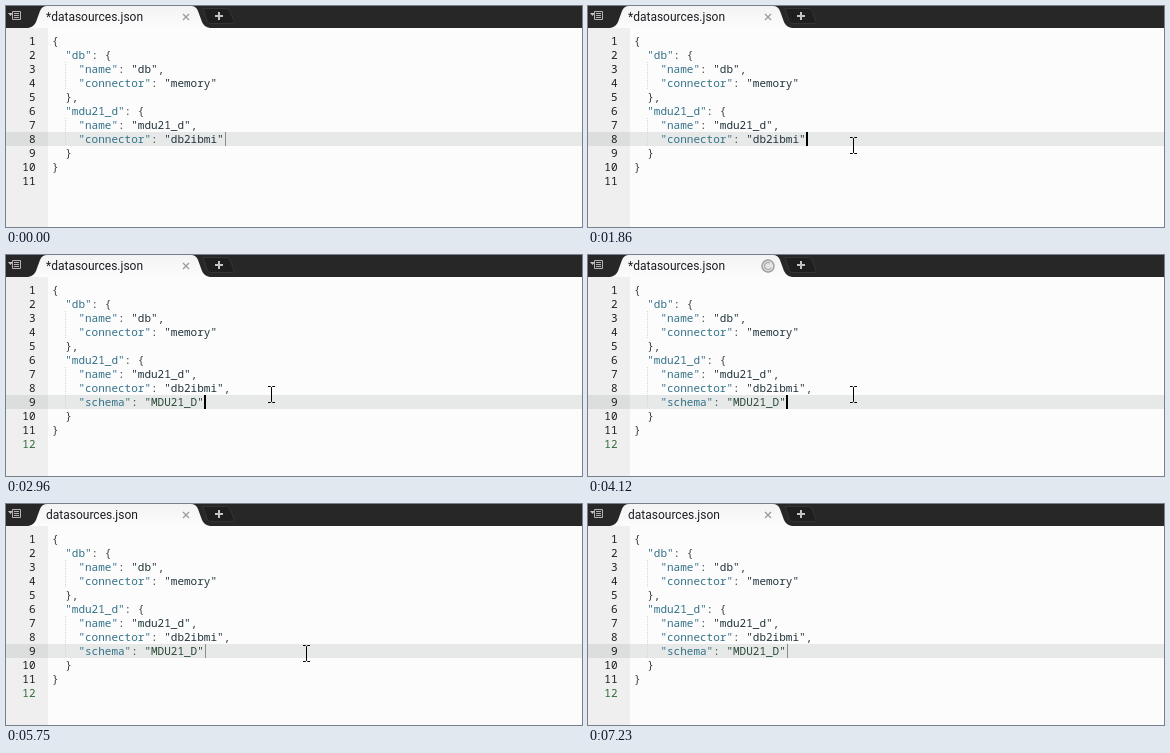
An HTML page that plays this animation: 576 by 221 pixels, repeating every 7.38 s.

```html
<!DOCTYPE html>
<html lang="en">
<head>
<meta charset="utf-8">
<title>Editing datasources.json</title>
<style>
  html, body { margin: 0; width: 100%; height: 100%; overflow: hidden; background: #fcfcfc; }
  svg { display: block; width: 576px; height: 221px; }
  text { white-space: pre; }
  .code { font: 11px "Noto Sans Mono", "Liberation Mono", monospace; fill: #3f3f3f; }
  .key { fill: #347289; }
  .value { fill: #22343c; }
  .fresh .value { fill: #2a4a38; }
  .number { text-anchor: end; fill: #1c1c1c; }
  .number.last { fill: #2f6a3a; }
  .label { font: 12px Roboto, "Liberation Sans", sans-serif; fill: #1c1c22; }
</style>
</head>
<body>
<svg viewBox="0 0 576 221" xmlns="http://www.w3.org/2000/svg">
  <defs>
    <linearGradient id="tabFill" x2="0" y2="1">
      <stop offset="0" stop-color="#f3f3f3"/>
      <stop offset="1" stop-color="#fcfcfc"/>
    </linearGradient>
  </defs>

  <rect width="576" height="221" fill="#fcfcfc"/>
  <rect width="42" height="221" fill="#efefef"/>
  <g id="band">
    <rect width="576" height="14" fill="#e6e9e8"/>
    <rect width="42" height="14" fill="#dcdddd"/>
  </g>
  <g id="before" class="code"></g>
  <g id="after" class="code"></g>
  <rect id="caret" height="14"/>

  <rect width="576" height="22" fill="#272727"/>
  <g fill="none" stroke="#b4b4b4">
    <path d="M2 7h5l-2.500 3z" fill="#c4c4c4" stroke="none"/>
    <path d="M6.500 5.500h8v8h-8zM8 7.500h5M8 9.500h5M8 11.500h5"/>
  </g>
  <path d="M197 2.500H220Q223 2.500 224 5L228 15Q229 17.500 226 17.500H205Q202 17.500 201 15Z" fill="#1f1f1f" stroke="#343434"/>
  <path d="M209 10h8M213 6v8" stroke="#c4c4c4" stroke-width="2"/>
  <path d="M22 22Q28 21 30 16L34 5Q36 0 41 0H185Q190 0 192 5L196 16Q198 21 204 22Z" fill="url(#tabFill)"/>
  <text id="title" class="label" x="40" y="15"></text>
  <path id="close" d="M177 8l6 6m0-6l-6 6" stroke="#9b9b9b" stroke-width="1.300"/>
  <g id="spinner" fill="none">
    <circle cx="180" cy="11" r="6" fill="#e4e4e4" stroke="#a0a0a0" stroke-width="1.500"/>
    <path d="M180 7.500a3.500 3.500 0 1 1-3.500 3.500" stroke="#a8a8a8" stroke-width="1.300"/>
  </g>
  <path id="pointer" d="M-3.500-8h2.500l1 1 1-1h2.500M0-7v14M-3.500 8h2.500l1-1 1 1h2.500" fill="none" stroke="#000"/>
</svg>
<script>
const LOOP = 7380, EDIT = 2030, SAVE = 3890, SAVED = 4200;
const ENTER = 70, REST = 530, LEAVE = 5590, PAUSE = 6210, GONE = 6520;
const COLUMN = 6.6, LEFT = 46, TOP = 28, LINE = 14, FRAME = 77.5;
const $ = id => document.getElementById(id);

const start = [
  '{',
  '  "db": {',
  '    "name": "db",',
  '    "connector": "memory"',
  '  },',
  '  "mdu21_d": {',
  '    "name": "mdu21_d",',
  '    "connector": "db2ibmi"',
  '  }',
  '}',
  ''
];
const edited = [...start];
edited.splice(7, 1, start[7] + ',', '    "schema": "MDU21_D"');

const show = (id, on) => $(id).setAttribute('visibility', on ? 'visible' : 'hidden');
const easeOut = p => 1 - (1 - p) ** 2;
const easeIn = p => p * p;
const easeInOut = p => p * p * (3 - 2 * p);

function add(parent, tag, attrs, content = '') {
  const node = document.createElementNS('http://www.w3.org/2000/svg', tag);
  for (const name in attrs) node.setAttribute(name, attrs[name]);
  node.textContent = content;
  return parent.appendChild(node);
}

function drawCode(group, lines, lastClass) {
  lines.forEach((line, i) => {
    const y = TOP + i * LINE + 11;
    const isLast = i === lines.length - 1;
    add(group, 'text', { x: 29.5, y, class: 'number' + (isLast ? lastClass : '') }, i + 1);
    if (line.startsWith('    ')) {
      add(group, 'path', {
        d: `M59.5 ${y - 11}v${LINE}`, stroke: '#d6d6d6', 'stroke-dasharray': '1 1'
      });
    }
    const text = add(group, 'text', {
      x: LEFT, y, class: line.includes('schema') ? 'fresh' : ''
    });
    for (const part of line.match(/"[^"]*"|[^"]+/g) || []) {
      const quoted = part[0] === '"';
      const isKey = quoted && line.includes(part + ':');
      add(text, 'tspan', { class: isKey ? 'key' : quoted ? 'value' : '' }, part);
    }
  });
}

// Lit for the first 59.5 % of each period between two times.
const blink = (t, from, to, period) =>
  t >= from && t < to && (t - from) % period < period * 0.595;

const caretLit = t =>
  blink(t, 930, EDIT, 930) || blink(t, 1952, 5980, 1008) || blink(t, 5980, 7230, 930);

function glide(t, begin, end, from, to, ease) {
  const steps = Math.round((end - begin) / FRAME);
  const step = Math.floor((t - begin) / (end - begin) * steps + 0.01);
  const p = ease(Math.min(Math.max(step / steps, 0), 1));
  return from.map((v, i) => Math.round(v + (to[i] - v) * p) + 0.5);
}

function pointerAt(t) {
  const rest = [265, 139], pause = [488, 201];
  if (t < LEAVE) return glide(t, ENTER, REST, [433, 212], rest, easeOut);
  if (t < PAUSE) return glide(t, LEAVE, PAUSE, rest, pause, easeInOut);
  return glide(t, PAUSE, GONE, pause, [505, 225], easeIn);
}

function render(t) {
  const isEdited = t >= EDIT;
  const row = isEdited ? 8 : 7;
  const line = (isEdited ? edited : start)[row];
  const y = TOP + row * LINE;
  show('before', !isEdited);
  show('after', isEdited);
  $('band').setAttribute('transform', `translate(0 ${y})`);

  const lit = caretLit(t);
  const caret = $('caret');
  caret.setAttribute('x', Math.round(LEFT + line.length * COLUMN) + (lit ? 0 : 1));
  caret.setAttribute('y', y);
  caret.setAttribute('width', lit ? 2 : 1);
  caret.setAttribute('fill', lit ? '#000' : '#8a8c8b');

  const saving = t >= SAVE && t < SAVED;
  $('title').textContent = (t < SAVED ? '*' : '') + 'datasources.json';
  show('close', !saving);
  show('spinner', saving);
  const turn = Math.floor((t - SAVE) / FRAME) * 60;
  $('spinner').setAttribute('transform', `rotate(${turn} 180 11)`);

  show('pointer', t >= ENTER && t < GONE);
  $('pointer').setAttribute('transform', `translate(${pointerAt(t)})`);
}

drawCode($('before'), start, '');
drawCode($('after'), edited, ' last');

const origin = performance.now();
function tick() {
  render((performance.now() - origin) % LOOP);
  requestAnimationFrame(tick);
}
tick();
</script>
</body>
</html>
```
